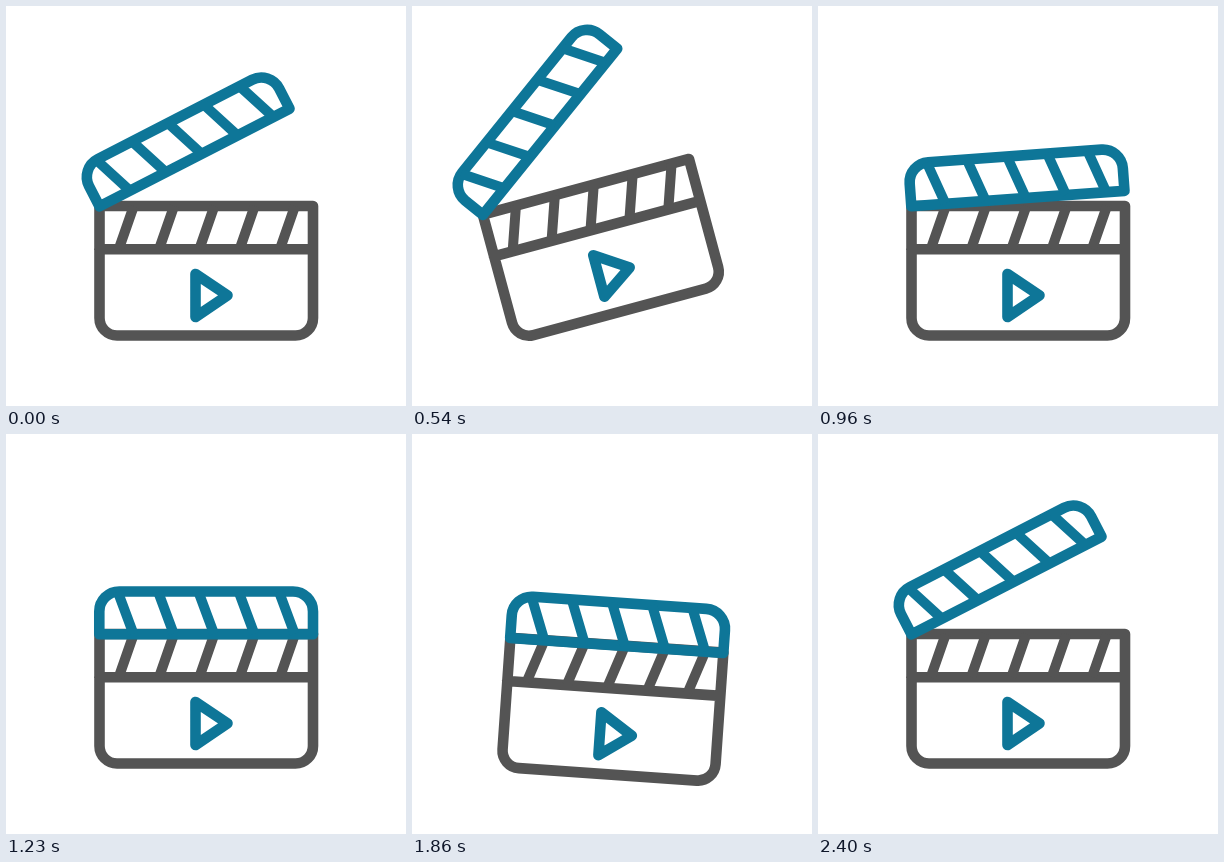
Write an HTML page that moves like this. It is 400 px wide and 400 px high and loops after 2460 ms.

```html
<!DOCTYPE html>
<html lang="en">
<head>
<meta charset="utf-8">
<title>Clapperboard</title>
<style>
  html, body { margin: 0; width: 100%; height: 100%; overflow: hidden; background: #fff; }
  svg { display: block; width: 100%; height: 100%; }
  g { fill: none; stroke-width: 10.6; stroke-linecap: round; stroke-linejoin: round; }
  .stripes { stroke-width: 10; stroke-linecap: butt; }
</style>
</head>
<body>
<svg viewBox="0 0 400 400">
  <g id="board">
    <g stroke="#545454">
      <path d="M93.5 200H307V312a17.5 17.5 0 0 1-17.5 17.5H111a17.5 17.5 0 0 1-17.5-17.5ZM93.3 243.3H307"/>
      <path class="stripes" id="lower"/>
    </g>
    <g stroke="#0e7698">
      <path d="M189.5 268V311L221.5 289.3Z"/>
      <g id="lid">
        <path d="M93.3 200.3V177.5a20 20 0 0 1 20-20H287a20 20 0 0 1 20 20V200.3Z"/>
        <path class="stripes" id="upper"/>
      </g>
    </g>
  </g>
</svg>
<script>
const LOOP = 2460;
const PIVOT = [100, 284];
const HINGE = [93.5, 200];

const el = id => document.getElementById(id);
const smooth = u => u * u * (3 - 2 * u);
const part = (t, from, to) => Math.min(1, Math.max(0, (t - from) / (to - from)));
const ease = (t, from, to) => smooth(part(t, from, to));
const settle = (t, from, to) => smooth(1 - (1 - part(t, from, to)) ** 2.2);

function stripes(x1, y1, x2, y2) {
  let d = "";
  for (let i = 0; i < 5; i++) {
    const dx = i * 40.3;
    d += `M${x1 + dx} ${y1}L${x2 + dx} ${y2}`;
  }
  return d;
}

function draw(t) {
  const dip = ease(t, 0, 135), back = ease(t, 585, 900);
  const nod = ease(t, 1590, 1860) - ease(t, 1860, 2070);

  const tilt = 4 * (dip + nod) - 19.1 * ease(t, 135, 414) + 15.1 * back;
  const drop = dip - back + nod;
  // lid: half close, swing wide, shut, reopen wide, rest
  const lid = -27.2 + 8.8 * ease(t, 0, 270) - 18.6 * ease(t, 270, 585)
    + 37 * settle(t, 585, 1320) - 37 * ease(t, 1860, 2070) + 9.8 * ease(t, 2070, 2400);

  el("board").setAttribute("transform", `translate(${-drop} ${4 * drop}) rotate(${tilt} ${PIVOT})`);
  el("lid").setAttribute("transform", `rotate(${lid} ${HINGE})`);
}

el("lower").setAttribute("d", stripes(127.8, 200, 112.8, 243));
el("upper").setAttribute("d", stripes(111.7, 157.5, 127.5, 200));

const start = performance.now();
function tick(now) {
  const t = Math.max(0, now - start) % LOOP;
  draw(Math.floor(t / 30) * 30);
  requestAnimationFrame(tick);
}
draw(0);
requestAnimationFrame(tick);
</script>
</body>
</html>
```
